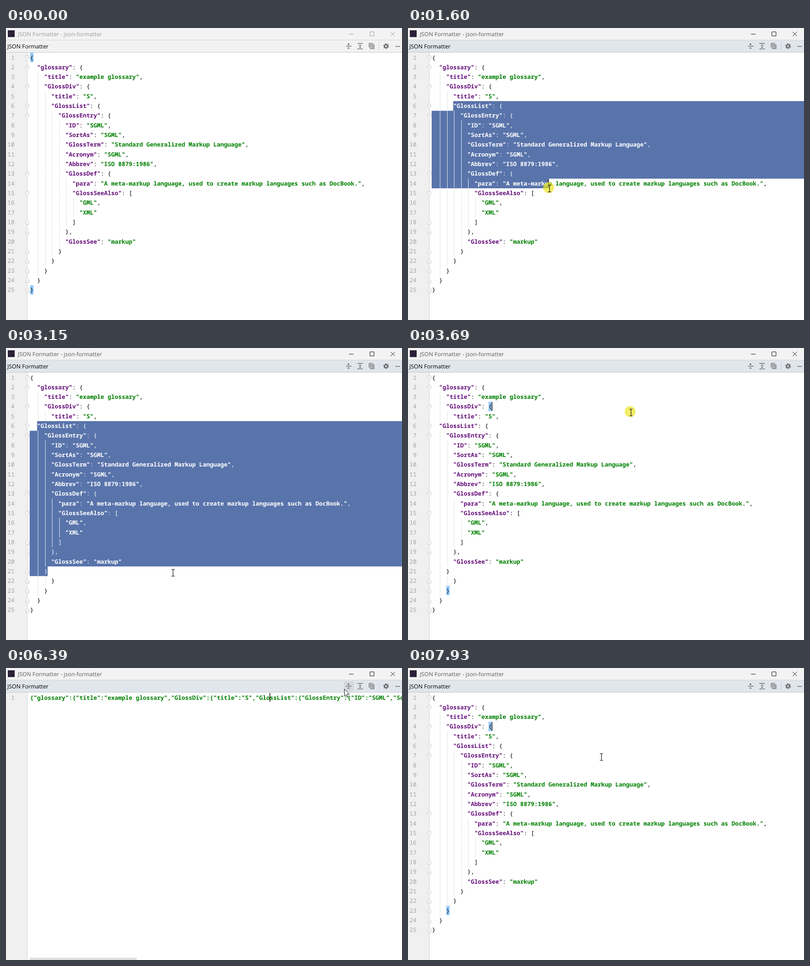
An HTML page for the animation above (8 s loop, 870 px wide and 643 px high).

```html
<!DOCTYPE html>
<html lang="en">
<head>
<meta charset="utf-8">
<title>JSON Formatter</title>
<style>
  html, body { margin: 0; width: 100%; height: 100%; overflow: hidden; background: #fff; }
  svg { display: block; width: 100%; height: 100%; }
  text { white-space: pre; text-rendering: geometricPrecision; }
  .code text, .numbers text { font: 500 12.917px "Noto Sans Mono", monospace; fill: #000; }
  .numbers text { font-weight: 400; fill: #a3a3a3; text-anchor: end; }
  .code .key { fill: #660e7a; font-weight: 600; }
  .code .str, .code .raw tspan { fill: #008000; font-weight: 600; }
  .code .guide { fill: #e3e3e3; }
  .white text, .white .key, .white .str { fill: #fff; }
  .white .guide { fill: #e6ebf4; }
  .ui { font: 12.4px "Open Sans", sans-serif; }
  .fold path { fill: #fff; stroke: #c6c6c6; }
  .icons { fill: none; stroke: #6e6e6e; stroke-width: 1.5; }
  .icons .solid { fill: #6e6e6e; stroke: none; }
</style>
</head>
<body>
<svg viewBox="0 0 870 643">
  <defs><clipPath id="selClip"><path id="selShape"/></clipPath></defs>
  <rect width="870" height="643" fill="#fff"/>

  <rect y="54" width="47" height="589" fill="#f0f0f0"/>
  <rect x="46.5" y="54" width="1" height="589" fill="#d2d2d2"/>
  <g id="marks" fill="#99ccff"></g>
  <g id="docs" class="code"></g>
  <g id="selection" clip-path="url(#selClip)">
    <rect x="52" y="54" width="818" height="589" fill="#5974ab"/>
    <g id="selDocs" class="code white"></g>
  </g>
  <g id="numbers" class="numbers"></g>
  <g id="folds" class="fold"></g>
  <rect id="caret" width="1.4" height="19.5" fill="#000"/>
  <g id="bulb">
    <path d="M66 119.500a4.900 4.900 0 0 1 3 8.800l-.6 1.700h-4.800l-.6-1.700a4.900 4.900 0 0 1 3-8.800z" fill="#f2a30f"/>
    <path d="M63.500 131h5M64 133h4" stroke="#737373"/>
  </g>
  <rect id="scroll" x="52" y="638" width="235" height="5" fill="#dedede"/>

  <rect width="870" height="27" fill="#f3f3f3"/>
  <rect id="bar" y="26" width="870" height="28"/>
  <path d="M0 26.500H870" stroke="#d4d4d4"/>
  <path d="M0 53.500H870" stroke="#c4c6c9"/>
  <rect x="4" y="5" width="15" height="15" fill="#2c2136"/>
  <text id="title" class="ui" x="26" y="17.500">JSON Formatter - json-formatter</text>
  <text class="ui" x="3" y="45">JSON Formatter</text>
  <path id="controls" fill="none" d="M753.500 13.500h10M799.500 8.500h9v9h-9zM845 8.500l9.500 9.500m0-9.500l-9.500 9.500"/>
  <rect id="hover" y="29" width="22" height="22" fill="#d5d9de"/>
  <g class="icons">
    <path d="M747 40h12M772 34h12M772 46h12M855 40.500h11"/>
    <path class="solid" d="M749.500 35h6l-3 3zM749.500 45h6l-3-3zM752 33h1v3h-1zM752 44h1v3h-1zM775 39h6l-3-3zM775 41h6l-3 3z"/>
    <path d="M798 43v-9h8M801 37h7.500v8.500h-7.500zM803 40h4M803 42.500h4"/>
    <path d="M819.500 31v18" stroke="#cbced2" stroke-width="1"/>
    <circle cx="835" cy="40" r="3.400" stroke-width="2.600"/>
    <circle cx="835" cy="40" r="5.200" stroke-width="2.200" stroke-dasharray="2.700 2.745"/>
  </g>

  <circle id="press" r="12" fill="#eee51c" fill-opacity=".68"/>
  <g id="mouse">
    <path id="beam" d="M-3.500-7.500h2.500l1 1 1-1h2.500M0-6.500v13M-3.500 7.500h2.500l1-1 1 1h2.500" fill="none" stroke="#111" stroke-width="1.200"/>
    <path id="arrow" d="M.5.500v15.500l3.600-3.400 2.500 5.700 2.400-1-2.500-5.600h5z" fill="#fff" stroke="#111"/>
  </g>
</svg>

<script>
const LOOP = 8000, STEP = 76.9;
const LEFT = 52.8, TOP = 54.3, CHAR = 7.75, ROW = 21.333;
const SEL_FIRST = 5, SEL_LAST = 20;

const data = { glossary: { title: "example glossary", GlossDiv: { title: "S", GlossList: { GlossEntry: {
  ID: "SGML", SortAs: "SGML", GlossTerm: "Standard Generalized Markup Language",
  Acronym: "SGML", Abbrev: "ISO 8879:1986",
  GlossDef: {
    para: "A meta-markup language, used to create markup languages such as DocBook.",
    GlossSeeAlso: ["GML", "XML"]
  },
  GlossSee: "markup"
} } } } };

const $ = id => document.getElementById(id);
const colX = col => LEFT + col * CHAR;
const rowY = row => TOP + row * ROW;

function add(parent, tag, attrs = {}, text) {
  const el = document.createElementNS("http://www.w3.org/2000/svg", tag);
  for (const name in attrs) el.setAttribute(name, attrs[name]);
  if (text !== undefined) el.textContent = text;
  return parent.appendChild(el);
}

function drawLine(parent, line, row) {
  const indent = line.search(/\S/);
  for (let col = 2; col < indent; col += 2)
    add(parent, "rect", { class: "guide", x: Math.round(colX(col) + 1.9), y: rowY(row), width: 1, height: ROW + .1 });
  const text = add(parent, "text", { x: colX(indent), y: rowY(row) + 15.2 });
  const parts = line.slice(indent).match(/"[^"]*"|[^"]+|"/g);
  parts.forEach((part, i) => {
    const type = part[0] !== '"' ? "" : (parts[i + 1] || "")[0] === ":" ? "key" : "str";
    add(text, "tspan", { class: type }, part);
  });
}

function drawDoc(parent, lines, className = "") {
  const group = add(parent, "g", { class: className });
  lines.forEach((line, row) => drawLine(group, line, row));
  return group;
}

// Pretty text with the selected block moved left by 0, 1 or 2 levels, then the one-line text.
const pretty = JSON.stringify(data, null, 2).split("\n");
const versions = [0, 1, 2].map(level => pretty.map((line, row) =>
  row >= SEL_FIRST && row <= SEL_LAST ? line.slice(2 * level) : line));
const compact = [JSON.stringify(data).slice(0, 112)];

const docs = versions.map(lines => drawDoc($("docs"), lines));
const selDocs = versions.map(lines => drawDoc($("selDocs"), lines));
const compactDocs = ["raw", ""].map(name => drawDoc($("docs"), compact, name));

const numbers = pretty.map((line, row) =>
  add($("numbers"), "text", { x: 18.8, y: rowY(row) + 15.2 }, row + 1));

pretty.forEach((line, row) => {
  const y = rowY(row) + 11.2;
  const flip = /[{[]$/.test(line) ? 1 : /^\s*[}\]]/.test(line) ? -1 : 0;
  if (flip) add($("folds"), "path", {
    transform: `translate(47 ${y}) scale(1 ${flip})`,
    d: "M-3.500-4.500h7v6l-3.500 3.500-3.500-3.500zM-2-.5h4"
  });
});

const bracePair = (a, colA, b, colB) => {
  const group = add($("marks"), "g");
  [[a, colA], [b, colB]].forEach(([row, col]) =>
    add(group, "rect", { x: colX(col), y: rowY(row), width: CHAR, height: ROW - .5 }));
  return group;
};
const outerBraces = bracePair(0, 0, 24, 0);
const innerBraces = bracePair(3, 16, 22, 4);

// time, x, y
const path = [
  [70, 642, 526], [300, 500, 420], [620, 200, 225], [840, 110, 167], [1070, 105, 163],
  [1220, 105, 163], [1400, 185, 235], [1615, 311, 353.5], [1800, 345, 418], [1990, 364, 463],
  [2300, 366, 485], [2530, 367, 495], [3300, 367, 495], [3440, 430, 320], [3610, 490, 142],
  [3840, 490, 142], [4070, 735, 33], [4230, 816, 33], [4530, 779, 32], [5180, 779, 32],
  [5540, 742, 49], [6080, 742, 49], [6160, 743, 46], [6800, 743, 46], [7100, 777, 42],
  [7550, 777, 42], [7920, 425, 196], [LOOP, 425, 196]
];

function mouseAt(time) {
  const t = Math.floor(time / STEP + .2) * STEP;
  const i = path.findIndex(point => point[0] > t);
  if (i < 1) return i < 0 ? path.at(-1).slice(1) : path[0].slice(1);
  const [t0, x0, y0] = path[i - 1], [t1, x1, y1] = path[i];
  const k = (t - t0) / (t1 - t0);
  return [x0 + (x1 - x0) * k, y0 + (y1 - y0) * k];
}

const show = (el, on) => el.setAttribute("display", on ? "inline" : "none");
const set = (id, attrs) => { for (const name in attrs) $(id).setAttribute(name, attrs[name]); };
const within = (t, ...spans) => spans.some(([from, to]) => t >= from && t < to);
const clamp = (v, low, high) => Math.max(low, Math.min(high, v));

function selectionEnd(t, x, y, lines) {
  if (t >= 2530) return [SEL_LAST, lines[SEL_LAST].length];
  const row = clamp(Math.floor((y - 3 - TOP) / ROW), SEL_FIRST, SEL_LAST);
  return [row, clamp(Math.round((x - LEFT) / CHAR), row === SEL_FIRST ? 6 : 0, lines[row].length)];
}

function selectionShape(startCol, row, col) {
  const x0 = colX(startCol), x1 = colX(col), y0 = rowY(SEL_FIRST), y1 = rowY(row);
  if (row === SEL_FIRST) return `M${x0} ${y0}H${x1}V${y0 + ROW}H${x0}z`;
  return `M${x0} ${y0}H870V${y1}H${x1}V${y1 + ROW}H52V${y0 + ROW}H${x0}z`;
}

function render(t) {
  const active = t >= 1220;
  set("bar", { fill: active ? "#e1e6ed" : "#f2f2f2" });
  set("title", { fill: active ? "#5a5a5a" : "#9b9b9b" });
  set("controls", { stroke: active ? "#111" : "#999" });

  const isCompact = within(t, [6310, 7550]);
  const level = within(t, [2910, 3070]) ? 1 : within(t, [3070, 4920]) ? 2 : 0;
  docs.forEach((doc, i) => show(doc, !isCompact && i === level));
  selDocs.forEach((doc, i) => show(doc, i === level));
  show(compactDocs[0], isCompact && t < 6690);
  show(compactDocs[1], isCompact && t >= 6690);
  numbers.forEach((number, i) => show(number, !isCompact || i === 0));
  show($("folds"), !isCompact);
  show($("scroll"), isCompact);
  show(outerBraces, !active);
  show(innerBraces, within(t, [3610, 4920], [5240, 6310], [7550, LOOP]));
  show($("bulb"), within(t, [4300, 4920]));

  const [x, y] = mouseAt(t);
  const selecting = within(t, [1220, 3610]);
  let caret = isCompact ? [0, 68] : [3, 17];
  if (selecting) {
    caret = selectionEnd(t, x, y, versions[level]);
    set("selShape", { d: selectionShape(6 - 2 * level, ...caret) });
  }
  show($("selection"), selecting);
  set("caret", { x: colX(caret[1]) - .7, y: rowY(caret[0]) + .8 });
  show($("caret"), within(t, [1220, 2530], [3610, 4070], [5240, 5770], [6310, 6860], [7550, LOOP]));

  const isArrow = y < 54;
  show($("mouse"), t >= 70);
  show($("beam"), !isArrow);
  show($("arrow"), isArrow);
  set("mouse", { transform: `translate(${x} ${y})` });
  set("press", { cx: isArrow ? x - .5 : x - 2, cy: isArrow ? y + .8 : y - 2 });
  show($("press"), within(t, [1220, 2760], [3610, 3840], [4760, 4920], [6160, 6310], [7250, 7400]));

  const button = [742, 767].find(left => x >= left && x <= left + 22);
  show($("hover"), button && y >= 29 && y <= 51);
  if (button) set("hover", { x: button });
}

function tick(now) {
  render(now % LOOP);
  requestAnimationFrame(tick);
}
render(0);
requestAnimationFrame(tick);
</script>
</body>
</html>
```
